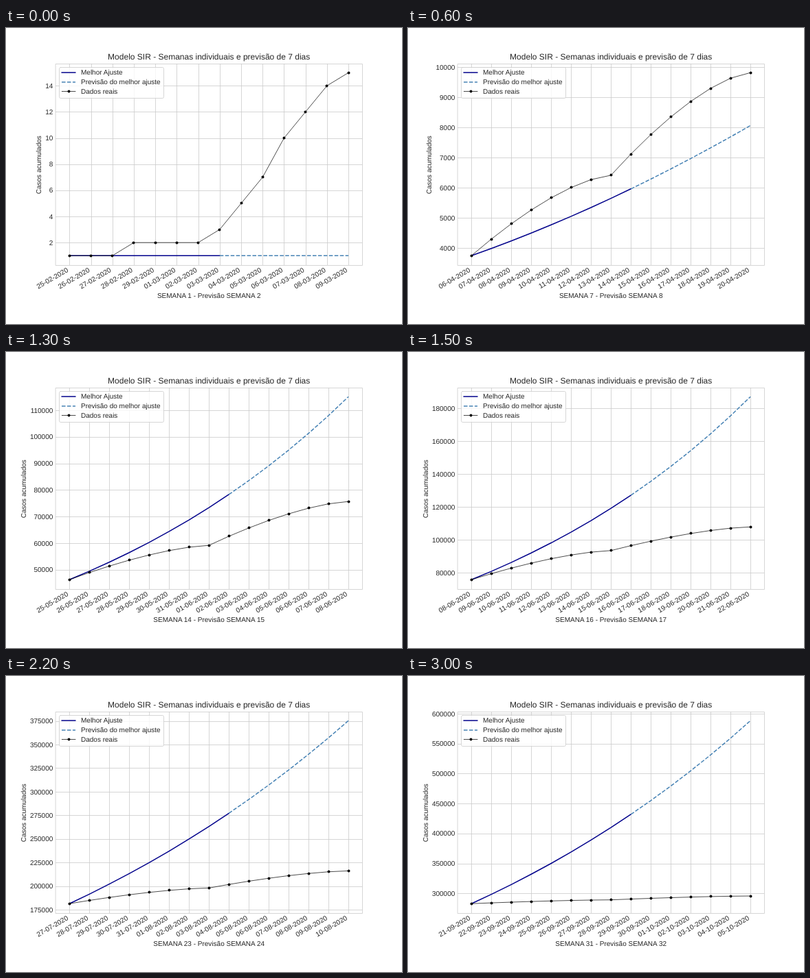
An HTML page with a canvas that plays this animation: 576 px wide and 432 px high, repeating every 3100 ms.

```html
<!DOCTYPE html>
<html lang="pt">
<head>
<meta charset="utf-8">
<title>Modelo SIR</title>
<style>
  html, body { margin: 0; width: 100%; height: 100%; overflow: hidden; background: #fff; }
  canvas { display: block; width: 576px; height: 432px; }
</style>
</head>
<body>
<canvas id="stage"></canvas>
<script>
const W = 576, H = 432, WEEKS = 31, STEP_MS = 100;
const BOX = { left: 72, right: 518.4, top: 51.84, bottom: 345.6 };
const PAD_X = (BOX.right - BOX.left) / 22, PAD_Y = (BOX.bottom - BOX.top) / 22;
const GRID = '#cccccc', INK = '#262626', FIT = '#00008b', FORECAST = '#4682b4';

// Key totals as [week, cases]; growth is exponential in between.
const totals = [
  [0, 1], [1, 2], [2, 15], [4, 650], [6, 3754], [7, 6417], [8, 9815],
  [10, 20073], [11, 27800], [12, 36200], [15, 75700], [16, 93400], [17, 107800],
  [19, 140200], [21, 166300], [25, 236000], [27, 257800], [30, 282900], [32, 295700]
];
// Mean daily growth of the fitted curve after 8 and 14 days: [week, g8, g14].
const growth = [
  [1, 0, 0], [3, .25, .24], [7, .0579, .0546], [11, .0673, .0658],
  [16, .0647, .0646], [20, .0579, .0577], [26, .048, .04605], [31, .0529, .0523]
];

function interpolate(rows, x, col = 1) {
  const n = Math.max(1, rows.findIndex(r => r[0] >= x));
  const a = rows[n - 1], b = rows[n];
  return a[col] + (b[col] - a[col]) * (x - a[0]) / (b[0] - a[0]);
}

const logTotals = totals.map(([week, cases]) => [week, Math.log(cases)]);
const weekTotal = week => Math.exp(interpolate(logTotals, week));
const smooth = u => u * u * (3 - 2 * u);
const easeOut = u => 1 - (1 - u) ** 1.5;

// The outbreak starts as an S-curve; later, reports slow down towards each weekend.
function cases(day) {
  const week = Math.floor(day / 7), u = day / 7 - week;
  if (!u) return Math.round(weekTotal(week));
  const from = weekTotal(week), to = weekTotal(week + 1);
  return Math.round(from + (to - from) * (week < 2 ? smooth : easeOut)(u));
}

function dateLabel(day) {
  const [y, m, d] = new Date(Date.UTC(2020, 1, 24 + day)).toISOString().slice(0, 10).split('-');
  return `${d}-${m}-${y}`;
}

function weekData(week) {
  const first = week === 1 ? 1 : 7 * (week - 1);
  const count = 7 * (week + 1) - first + 1;
  const days = Array.from({ length: count }, (_, i) => first + i);
  const real = days.map(cases);
  const g8 = interpolate(growth, week, 1), g14 = interpolate(growth, week, 2);
  const bend = (g14 - g8) / 6, base = g8 - 8 * bend;
  const model = days.map((_, i) => real[0] * Math.exp(i * (base + bend * i)));
  return { days, real, model, split: count - 7 };
}

function tickStep(range) {
  const raw = range / 9, mag = 10 ** Math.floor(Math.log10(raw));
  return mag * [1, 2, 2.5, 5, 10].find(s => s * mag >= raw);
}

const canvas = document.getElementById('stage');
const ctx = canvas.getContext('2d');
const ratio = window.devicePixelRatio || 1;
canvas.width = W * ratio;
canvas.height = H * ratio;
ctx.scale(ratio, ratio);

const snap = v => Math.round(v) + 0.5;

function text(str, x, y, { align = 'left', size = 10, angle = 0 } = {}) {
  ctx.save();
  ctx.translate(x, y);
  ctx.rotate(angle * Math.PI / 180);
  ctx.font = `${size}px "Liberation Sans", Arial, sans-serif`;
  ctx.textRendering = 'geometricPrecision';
  ctx.textAlign = align;
  ctx.fillStyle = INK;
  ctx.fillText(str, 0, 0);
  ctx.restore();
}

function polyline(points, color, width, dash = []) {
  ctx.beginPath();
  points.forEach(([x, y]) => ctx.lineTo(x, y));
  ctx.strokeStyle = color;
  ctx.lineWidth = width;
  ctx.lineJoin = 'round';
  ctx.lineCap = dash.length ? 'butt' : 'round';
  ctx.setLineDash(dash);
  ctx.stroke();
  ctx.setLineDash([]);
}

function gridLine(x1, y1, x2, y2) {
  ctx.beginPath();
  ctx.moveTo(x1, y1);
  ctx.lineTo(x2, y2);
  ctx.strokeStyle = GRID;
  ctx.lineWidth = 0.8;
  ctx.lineCap = 'butt';
  ctx.stroke();
}

function dot(x, y) {
  ctx.beginPath();
  ctx.arc(Math.floor(x) + 0.5, Math.floor(y) + 0.5, 2, 0, 2 * Math.PI);
  ctx.fillStyle = '#000';
  ctx.fill();
}

const fitLine = points => polyline(points, FIT, 1.5);
const forecastLine = points => polyline(points, FORECAST, 1.5, [5.55, 2.4]);
const realLine = points => polyline(points, '#000', 0.7);

function legend() {
  ctx.beginPath();
  ctx.roundRect(77.5, 57.5, 152, 45, 2);
  ctx.fillStyle = 'rgba(255, 255, 255, 0.8)';
  ctx.fill();
  ctx.strokeStyle = 'rgba(204, 204, 204, 0.8)';
  ctx.lineWidth = 1;
  ctx.stroke();
  const entries = [
    ['Melhor Ajuste', fitLine, 65],
    ['Previsão do melhor ajuste', forecastLine, 79],
    ['Dados reais', realLine, 92.5]
  ];
  entries.forEach(([label, line, y], i) => {
    line([[81, y], [101, y]]);
    text(label, 109, 68 + 14 * i);
  });
  dot(91, 92.5);
}

function draw(week) {
  const { days, real, model, split } = weekData(week);
  const all = real.concat(model);
  const min = Math.min(...all), max = Math.max(...all), range = max - min;
  const px = i => BOX.left + PAD_X * (1 + 20 * i / (days.length - 1));
  const py = v => BOX.bottom - PAD_Y * (1 + 20 * (v - min) / range);
  const plot = values => values.map((v, i) => [px(i), py(v)]);

  ctx.fillStyle = '#fff';
  ctx.fillRect(0, 0, W, H);

  days.forEach((day, i) => {
    const x = px(i);
    gridLine(snap(x), 52, snap(x), 346);
    text(dateLabel(day), x - 1.05, 355.3, { align: 'right', angle: -30 });
  });

  const step = tickStep(range * 1.1);
  let labelWidth = 0;
  for (let v = Math.ceil((min - range / 20) / step) * step; v <= max + range / 20; v += step) {
    const y = py(v), label = String(Math.round(v));
    gridLine(72, snap(y), 518, snap(y));
    text(label, 68.3, y + 3.6, { align: 'right' });
    labelWidth = Math.max(labelWidth, label.length * 5.56);
  }

  const curve = plot(model), points = plot(real);
  fitLine(curve.slice(0, split + 1));
  forecastLine(curve.slice(split));
  realLine(points);
  points.forEach(([x, y]) => dot(x, y));

  ctx.strokeStyle = GRID;
  ctx.lineWidth = 0.8;
  ctx.strokeRect(72.5, 52.5, 446, 294);
  legend();

  const middle = (BOX.left + BOX.right) / 2;
  text('Modelo SIR - Semanas individuais e previsão de 7 dias', middle, 46, { align: 'center', size: 12 });
  text(`SEMANA ${week} - Previsão SEMANA ${week + 1}`, middle, 394, { align: 'center' });
  text('Casos acumulados', 61.9 - labelWidth, (BOX.top + BOX.bottom) / 2 + 1, { align: 'center', angle: -90 });
}

let shown = 0;
function tick() {
  const week = 1 + Math.floor(performance.now() / STEP_MS) % WEEKS;
  if (week !== shown) draw(shown = week);
  requestAnimationFrame(tick);
}
tick();
</script>
</body>
</html>
```
